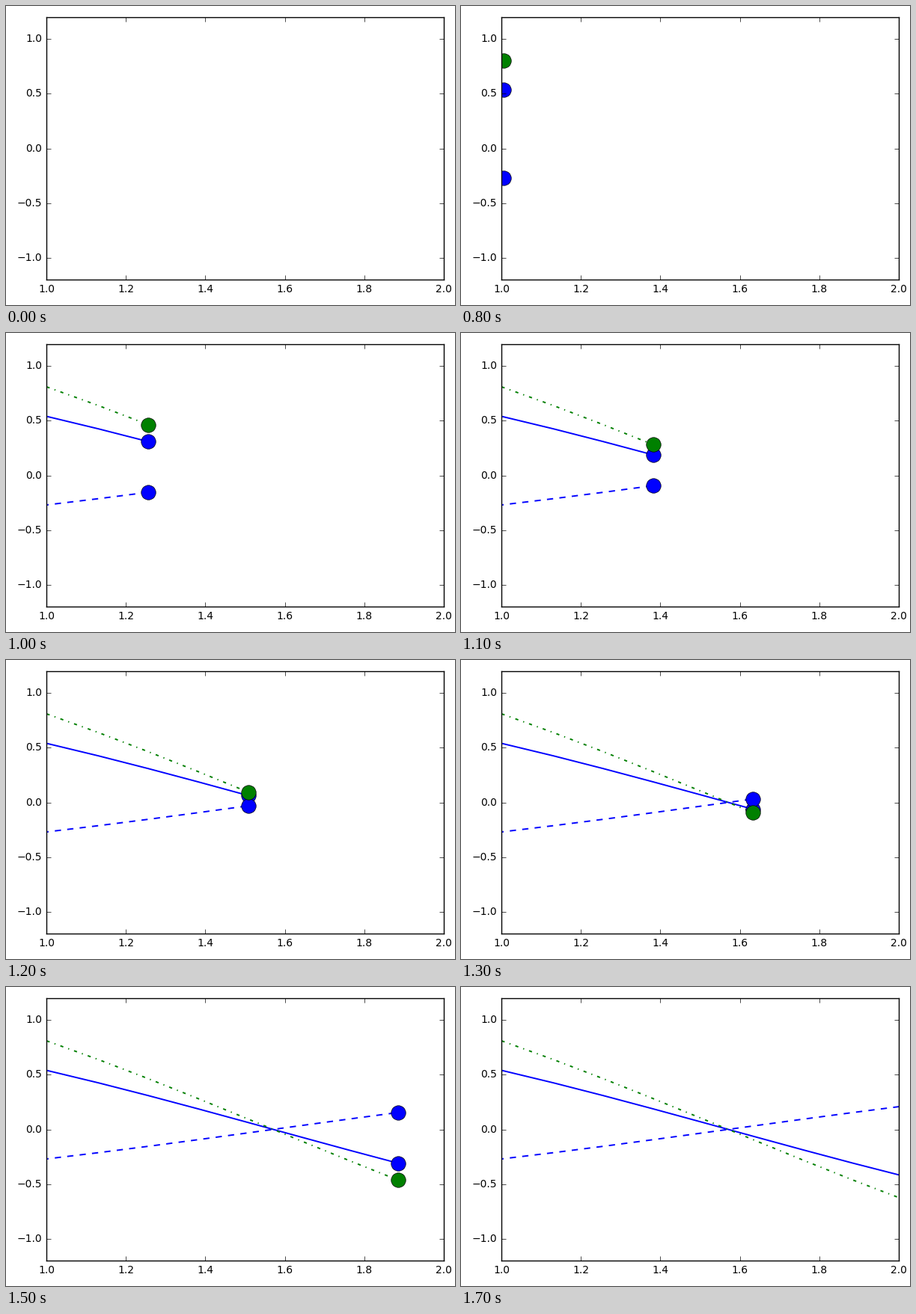
A matplotlib script for the animation above (5100 ms loop, 600 by 400 pixels).

```python
import numpy as np
import matplotlib.pyplot as plt
from matplotlib.animation import FuncAnimation

FRAMES, INTERVAL = 51, 100

plt.style.use("classic")
plt.rcParams.update({
    "font.family": "DejaVu Sans",
    "font.size": 10,
    "figure.facecolor": "white",
})

fig = plt.figure(figsize=(6, 4), dpi=100)
ax = fig.add_axes([54 / 600, 34 / 400, 531 / 600, 351 / 400])
ax.set(xlim=(1, 2), ylim=(-1.2, 1.2))
ax.set_xticks(np.linspace(1, 2, 6))
ax.set_yticks(np.linspace(-1, 1, 5))

x = np.linspace(0, 2 * np.pi, FRAMES)
STYLES = [(1, "b-"), (-0.5, "b--"), (1.5, "g-.")]  # amplitude, format
curves = [amplitude * np.cos(x) for amplitude, _ in STYLES]
trails = [ax.plot([], [], style, lw=1.4)[0] for _, style in STYLES]
heads = [ax.plot([], [], style[0] + "o", ms=14, mew=0.5, mec="black")[0]
         for _, style in STYLES]


def update(i):
    for y, trail, head in zip(curves, trails, heads):
        trail.set_data(x[:i + 1], y[:i + 1])
        head.set_data(x[i:i + 1], y[i:i + 1])
    return trails + heads


anim = FuncAnimation(fig, update, frames=FRAMES, interval=INTERVAL,
                     init_func=lambda: update(0), repeat=True, repeat_delay=0)
plt.show()
```
